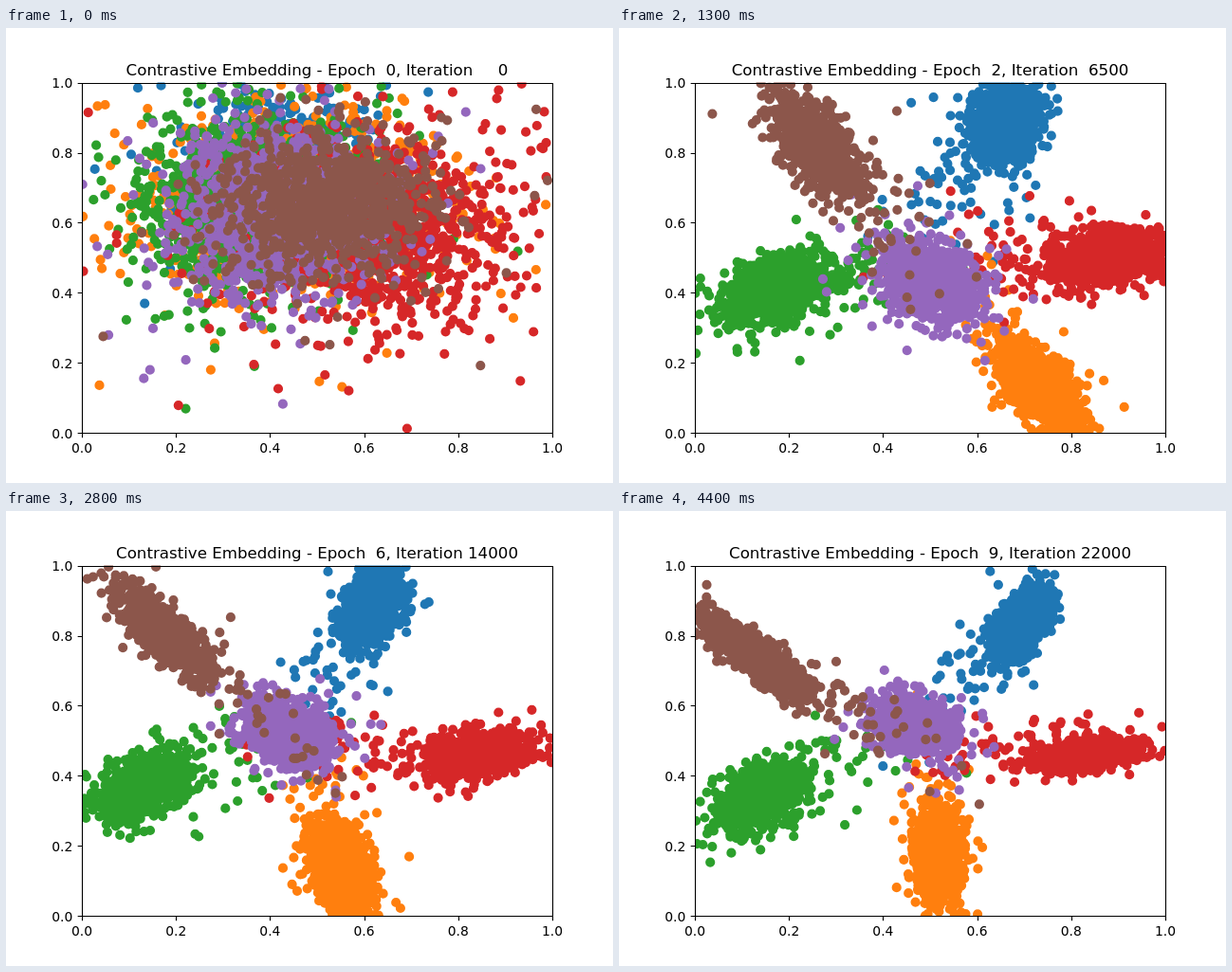
These frames come from a looping animation (640x480 px, 7400 ms). An HTML page:

```html
<!DOCTYPE html>
<html lang="en">
<head>
<meta charset="utf-8">
<title>Contrastive Embedding</title>
<style>
  html, body { margin: 0; width: 100%; height: 100%; overflow: hidden; background: #fff; }
  svg { display: block; width: 640px; height: 480px; }
  text { font: 13.89px "DejaVu Sans", sans-serif; white-space: pre; }
  #title { font-size: 16.67px; text-anchor: middle; }
  #dots path { fill: none; stroke-width: 10.2; stroke-linecap: round; }
  #axes { fill: none; stroke: #000; stroke-width: 1.11; }
</style>
</head>
<body>
<svg viewBox="0 0 640 480">
  <clipPath id="box"><rect x="80" y="57.6" width="496" height="369.6"/></clipPath>
  <g id="dots" clip-path="url(#box)"></g>
  <path id="axes"/>
  <g id="labels"></g>
  <text id="title" x="328" y="49.6"></text>
</svg>
<script>
const NS = 'http://www.w3.org/2000/svg';
const $ = id => document.getElementById(id);
const STEP = 100, LAST = 44, LOOP = 7400, PER_CLASS = 1000;
const PATH_KEYS = [0, 5, 13, 19, 28, 35, 44];
const SHAPE_KEYS = [0, 5, 19, 44];

// path: cluster centres at PATH_KEYS; shape: [sx, sy, correlation] at SHAPE_KEYS
const clusters = [
  { color: '#1f77b4',
    path: [[.43, .74], [.67, .86], [.655, .88], [.645, .85], [.615, .88], [.64, .85], [.69, .83]],
    shape: [[.085, .085], [.042, .06, 0], [.03, .05, .2], [.03, .05, .55]] },
  { color: '#ff7f0e',
    path: [[.46, .66], [.71, .17], [.735, .13], [.645, .14], [.55, .14], [.6, .15], [.52, .17]],
    shape: [[.14, .12], [.055, .07, -.8], [.035, .055, -.5], [.023, .062, 0]] },
  { color: '#2ca02c',
    path: [[.36, .66], [.17, .43], [.18, .41], [.155, .36], [.13, .37], [.17, .31], [.14, .34]],
    shape: [[.105, .12], [.07, .05, .3], [.045, .042, .4], [.043, .045, .45]] },
  { color: '#d62728',
    path: [[.62, .58], [.84, .53], [.87, .5], [.83, .5], [.84, .46], [.85, .47], [.83, .46]],
    shape: [[.14, .13], [.08, .042, .4], [.052, .035, .2], [.053, .022, .45]] },
  { color: '#9467bd',
    path: [[.4, .62], [.43, .4], [.5, .43], [.47, .46], [.44, .52], [.48, .51], [.46, .55]],
    shape: [[.1, .12], [.058, .058, -.2], [.043, .045, -.3], [.04, .036, -.2]] },
  { color: '#8c564b',
    path: [[.52, .65], [.28, .79], [.26, .82], [.22, .8], [.17, .81], [.18, .78], [.13, .74]],
    shape: [[.105, .095], [.048, .066, -.3], [.042, .06, -.75], [.053, .055, -.85]] }
];

let seed = 20731;
function rand() {
  seed = (seed + 0x6D2B79F5) | 0;
  let h = Math.imul(seed ^ (seed >>> 15), seed | 1);
  h ^= h + Math.imul(h ^ (h >>> 7), h | 61);
  return ((h ^ (h >>> 14)) >>> 0) / 4294967296;
}

function makePoint() {
  const stray = rand() < .08;
  return {
    r: Math.sqrt(-2 * Math.log(1 - rand())) * (stray ? 1.9 : 1),
    angle: rand() * 2 * Math.PI,
    spin: (rand() - .5) * .8,
    pull: stray ? .85 * rand() ** 1.6 : 0
  };
}

function add(parent, tag, attrs, text = '') {
  const el = document.createElementNS(NS, tag);
  for (const k in attrs) el.setAttribute(k, attrs[k]);
  el.textContent = text;
  return parent.appendChild(el);
}

const toX = x => 80 + 496 * x;
const toY = y => 427.2 - 369.6 * y;
const snap = v => Math.floor(v + .5) + .5;
const bounce = v => v < 0 ? -v * .6 : v > 1 ? 1 - (v - 1) * .6 : v;

function sample(keys, values, frame) {
  let i = 0;
  while (i < keys.length - 2 && frame >= keys[i + 1]) i++;
  let u = (frame - keys[i]) / (keys[i + 1] - keys[i]);
  if (i === 0) u = u ** .4; // classes separate quickly at first
  return values[i + 1].map((b, k) => {
    const a = values[i][k] || 0;
    return a + (b - a) * u;
  });
}

function cloud(c, frame) {
  const [cx, cy] = sample(PATH_KEYS, c.path, frame);
  const [sx, sy, rho] = sample(SHAPE_KEYS, c.shape, frame);
  const side = Math.sqrt(1 - rho * rho);
  const lean = Math.min(1, frame / 3);
  let d = '';
  for (const p of c.points) {
    const angle = p.angle + p.spin * frame, pull = p.pull * lean;
    const a = p.r * Math.cos(angle), b = p.r * Math.sin(angle);
    const x = bounce(cx + (.48 - cx) * pull + sx * a);
    const y = bounce(cy + (.5 - cy) * pull + sy * (rho * a + side * b));
    d += `M${toX(x).toFixed(1)} ${toY(y).toFixed(1)}h0`;
  }
  return d;
}

function drawAxes() {
  const [l, r, t, b] = [toX(0), toX(1), toY(1), toY(0)].map(snap);
  let d = `M${l} ${t}H${r}V${b}H${l}Z`;
  for (let i = 0; i <= 5; i++) {
    const v = i / 5, x = snap(toX(v)), y = snap(toY(v)), label = v.toFixed(1);
    d += `M${x} ${b}v4.86M${l} ${y}h-4.86`;
    add($('labels'), 'text', { x: toX(v), y: 448, 'text-anchor': 'middle' }, label);
    add($('labels'), 'text', { x: 70.3, y: toY(v) + 5.4, 'text-anchor': 'end' }, label);
  }
  $('axes').setAttribute('d', d);
}

function draw(frame) {
  const iteration = frame * 500, epoch = Math.floor(iteration / 2251);
  $('title').textContent = 'Contrastive Embedding - Epoch ' + String(epoch).padStart(2) +
    ', Iteration ' + String(iteration).padStart(5);
  for (const c of clusters) c.el.setAttribute('d', cloud(c, frame));
}

for (const c of clusters) {
  c.points = Array.from({ length: PER_CLASS }, makePoint);
  c.el = add($('dots'), 'path', { stroke: c.color });
}
drawAxes();

let shown = -1;
function tick(now) {
  const frame = Math.min(LAST, Math.floor((now % LOOP) / STEP));
  if (frame !== shown) draw(shown = frame);
  requestAnimationFrame(tick);
}
tick(0);
</script>
</body>
</html>
```
